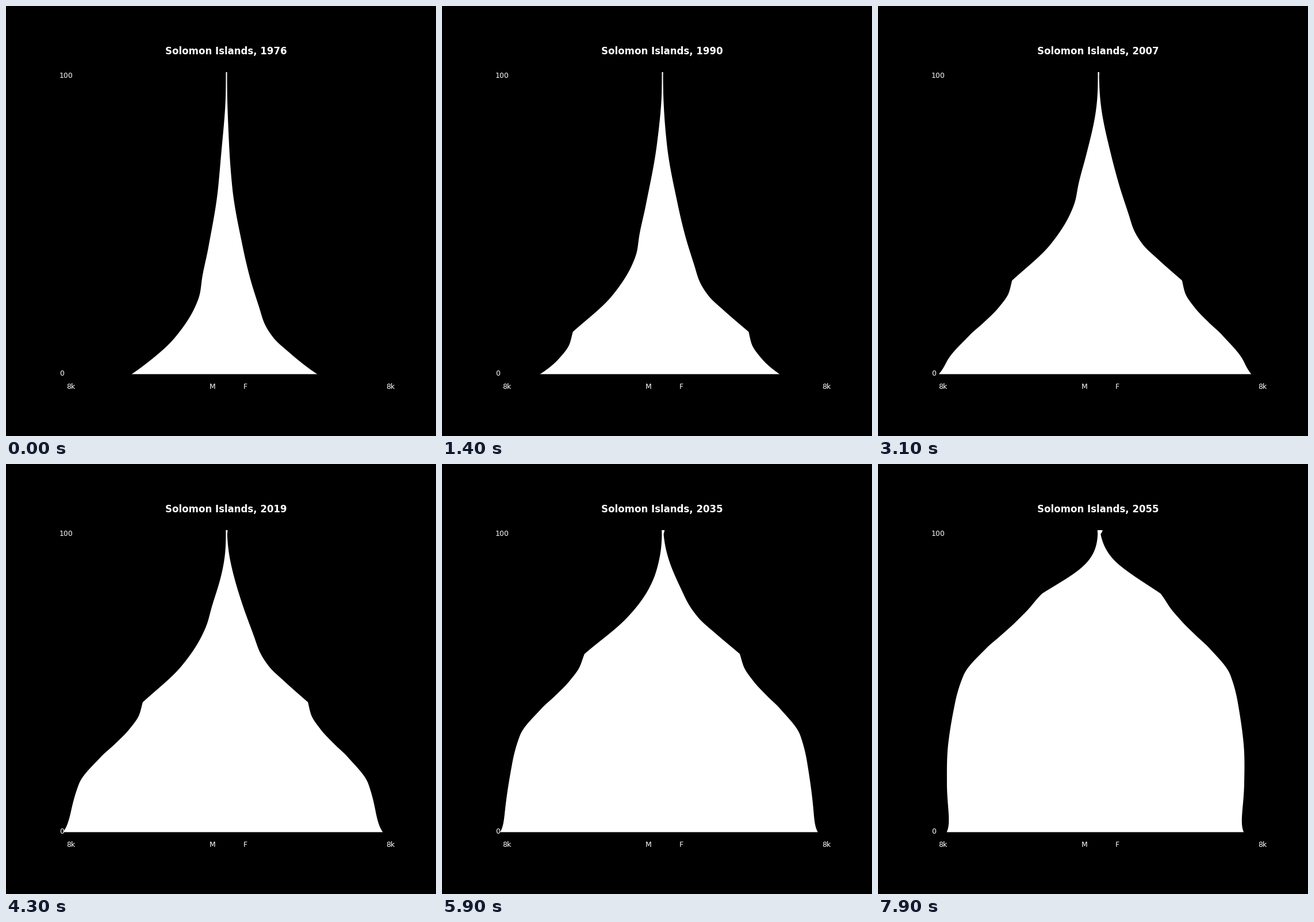
Write a matplotlib script that moves like this. It is 748 px wide and 748 px high and loops after 8 s.

```python
import numpy as np
import matplotlib.pyplot as plt
from matplotlib.animation import FuncAnimation

SIZE, DPI = 748, 100
MID, BASE, STEP = 383.5, 640.4, 5.254  # centre x, y at age 0, pixels per year of age
START, YEARS = 1976, 80
AGES = np.linspace(0, 100, 401)


def smooth(points):
    """Monotone cubic curve through (x, y) points."""
    x, y = np.array(points, float).T
    h = np.diff(x)
    d = np.diff(y) / h
    both = d[:-1] * d[1:]
    inner = np.where(both > 0, 2 * both / np.where(both > 0, d[:-1] + d[1:], 1), 0)
    m = np.concatenate([d[:1], inner, d[-1:]])

    def curve(q):
        q = np.clip(q, x[0], x[-1])
        i = np.clip(np.searchsorted(x, q, side="right") - 1, 0, len(h) - 1)
        t = (q - x[i]) / h[i]
        return (y[i] * (1 + 2 * t) * (1 - t) ** 2 + y[i + 1] * t * t * (3 - 2 * t)
                + h[i] * t * (1 - t) * (m[i] * (1 - t) - m[i + 1] * t))
    return curve


# Size of each birth cohort as a half-width in pixels
men_before = smooth([(1876, 10), (1900, 15), (1914, 19), (1934, 35.8), (1944, 46.6),
                     (1949, 50), (1954, 59.5), (1964, 95), (1976, 165)])
women_before = smooth([(1876, 4), (1900, 7.2), (1914, 12.4), (1934, 31.8), (1944, 44.5),
                       (1954, 61), (1959, 69.5), (1964, 86), (1969, 114.5), (1976, 158)])
men_after = smooth([(1976, 165), (1980, 169.5), (1985, 187), (1990, 213), (1994, 236),
                    (2003, 272.5), (2012, 281.5), (2026, 285.5), (2039, 280), (2055, 264)])


def half_width(year, before, girls_per_boy, drift, frailty):
    """Cohorts rise one age a year and thin out by infant, steady and old-age loss."""
    born = year - AGES
    births = np.where(born < START, before(born), girls_per_boy * men_after(born))
    infant = 0.028 * (1 - np.exp(-AGES / 2.5))
    ageing = frailty * (1.31 + 2.33 / (1 + np.exp((born - 1970) / 5))) * 1e-4
    loss = infant + drift * AGES + ageing * (np.exp(0.095 * AGES) - 1)
    width = births * np.exp(-loss)
    # The last group gathers everyone past 100
    width *= 1 + 2 * np.clip((AGES - 98.7) / 1.3, 0, 1)
    return np.hypot(width, 1)


plt.rcParams["font.family"] = "DejaVu Sans"
fig = plt.figure(figsize=(SIZE / DPI, SIZE / DPI), dpi=DPI, facecolor="black")
ax = fig.add_axes([0, 0, 1, 1])
ax.set(xlim=(0, SIZE), ylim=(SIZE, 0))
ax.axis("off")

pyramid, = ax.fill([0, 0, 0], [0, 0, 0], color="white", lw=0)
title = ax.text(383, 84, "", color="white", size=12, weight="bold", ha="center")
for x, y, label, align in [(93, 125, "100", "left"), (93, 643, "0", "left"),
                           (112.4, 666, "8k", "center"), (359.5, 666, "M", "center"),
                           (416, 666, "F", "center"), (668.6, 666, "8k", "center")]:
    ax.text(x, y, label, color="white", size=9, ha=align)

rows = BASE - AGES * STEP


def draw(frame):
    year = START + frame
    left = MID - half_width(year, men_before, 1, 0.002, 1)
    right = MID + half_width(year, women_before, 0.957, 0.0017, 0.65)
    pyramid.set_xy(np.column_stack([np.r_[left, right[::-1]],
                                    np.r_[rows, rows[::-1]]]))
    title.set_text(f"Solomon Islands, {year}")
    return pyramid, title


anim = FuncAnimation(fig, draw, frames=YEARS, interval=100, repeat=True, repeat_delay=0)
plt.show()
```
